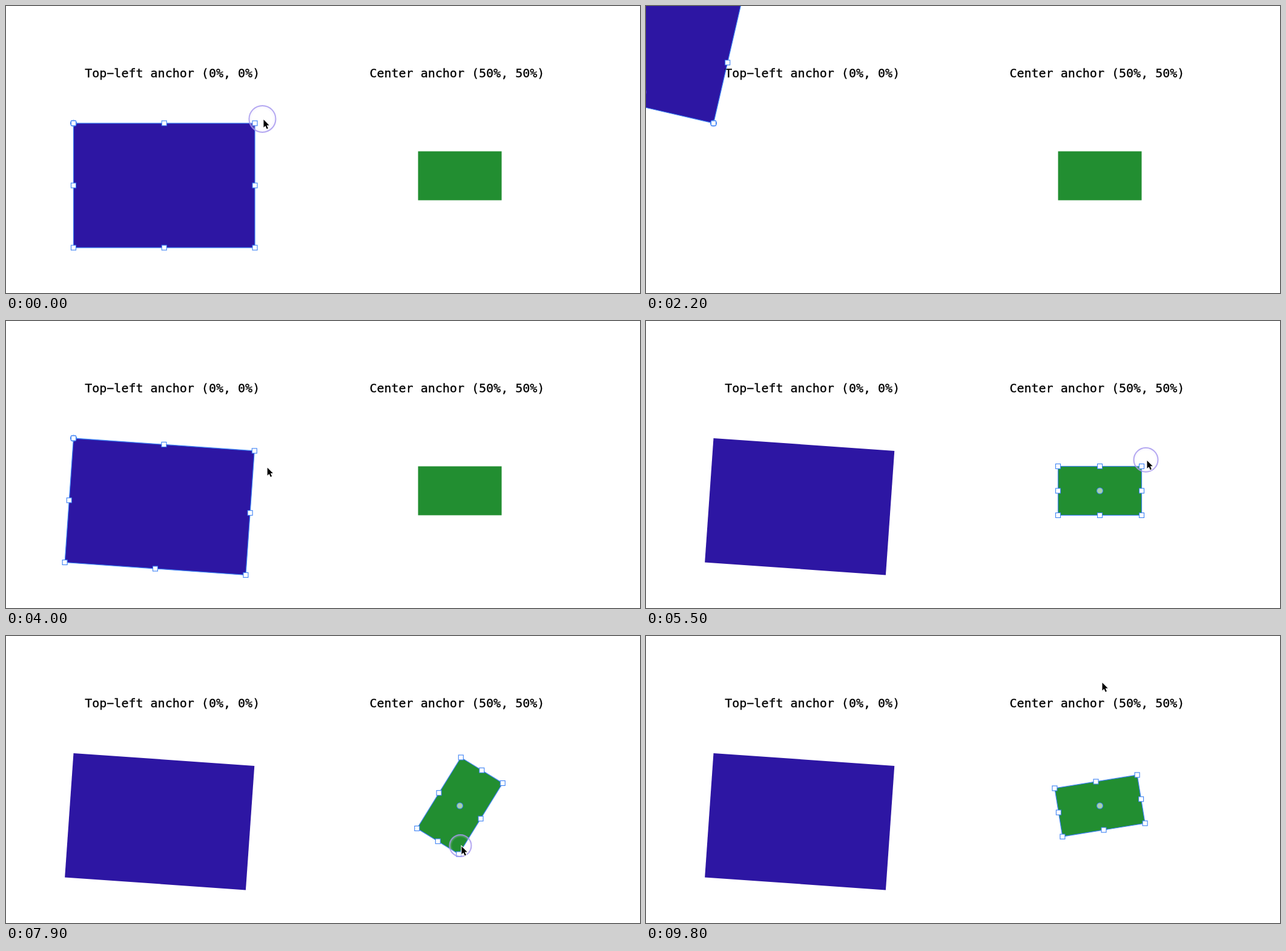
Recreate the animation shown at these times as an HTML page. Size 1047 px wide and 475 px high, loop 9.9 s.

```html
<!DOCTYPE html>
<html lang="en">
<head>
<meta charset="utf-8">
<title>Rotation anchors</title>
<style>
html, body { margin: 0; width: 100%; height: 100%; overflow: hidden; background: #fff; }
svg { display: block; width: 1047px; height: 475px; }
text { font: 20px "DejaVu Sans Mono", monospace; fill: #000; stroke: #000; stroke-width: .35; }
.line { fill: none; stroke: #3d82f5; stroke-width: 1.2; }
.grip { fill: #fff; stroke: #3d82f5; stroke-width: 1.1; }
</style>
</head>
<body>
<svg id="stage" viewBox="0 0 1047 475">
  <defs>
    <radialGradient id="glow">
      <stop offset=".75" stop-color="#e4defc" stop-opacity="0"/>
      <stop offset="1" stop-color="#e4defc" stop-opacity=".4"/>
    </radialGradient>
  </defs>
  <g id="shapes"></g>
  <text x="130.2" y="118">Top−left anchor (0%, 0%)</text>
  <text x="600.4" y="118">Center anchor (50%, 50%)</text>
  <g id="frames"></g>
  <circle id="ring" fill="url(#glow)" stroke="#a394ee" stroke-opacity=".8" stroke-width="2"/>
  <path id="arrow" d="M0 0V13L3 10.2L5.2 15.3L7.4 14.4L5.2 9.3H9.2Z" stroke="#fff" stroke-width="2" paint-order="stroke"/>
</svg>
<script>
const NS = "http://www.w3.org/2000/svg";
const LOOP = 9900, STEP = 100;
const PAUSES = [2300, 4500, 6500, 9000, 9300];
const BLUE_DROP = 3700, HOVER = 4400, SELECT = 4700, GREEN_GRAB = 5500, GREEN_DROP = 9700;
const PRESSES = [[0, BLUE_DROP], [4650, 4850], [5400, GREEN_DROP]];
const $ = id => document.getElementById(id);

function add(parent, tag, attrs) {
  const el = document.createElementNS(NS, tag);
  set(el, attrs);
  return parent.appendChild(el);
}
function set(el, attrs) {
  for (const k in attrs) el.setAttribute(k, attrs[k]);
}
const show = (el, on) => { el.style.display = on ? "" : "none"; };

const smooth = u => {
  u = Math.max(0, Math.min(1, u));
  return u * u * (3 - 2 * u);
};
const bump = (t, mid, width) => Math.exp(-(((t - mid) / width) ** 2));

// Smooth curve through keys [time, ...values], at rest at both ends
function spline(keys, t) {
  const last = keys.length - 1;
  t = Math.max(keys[0][0], Math.min(keys[last][0], t));
  const i = Math.max(1, keys.findIndex(k => t <= k[0]));
  const a = keys[i - 1], b = keys[i], span = b[0] - a[0], u = (t - a[0]) / span;
  const slope = (n, j) => n === 0 || n === last ? 0 :
    (keys[n + 1][j] - keys[n - 1][j]) / (keys[n + 1][0] - keys[n - 1][0]);
  return a.slice(1).map((v, n) => {
    const j = n + 1;
    return v + (b[j] - v) * smooth(u) +
      span * u * (1 - u) * ((1 - u) * slope(i - 1, j) - u * slope(i, j));
  });
}

// A rectangle that turns about (cx, cy); ax, ay give the anchor as a fraction
function makeBox(cx, cy, w, h, ax, ay, fill) {
  const size = { x: -w * ax, y: -h * ay, width: w, height: h };
  const body = add($("shapes"), "rect", { ...size, fill });
  const frame = add($("frames"), "g", {});
  const line = add(frame, "rect", { ...size, class: "line" });
  const dot = add(frame, "circle", {
    cx, cy, r: 5, fill: "#fff", "fill-opacity": .6, stroke: "#3d82f5", "stroke-width": 1.1
  });
  const grips = [];
  for (const u of [0, .5, 1]) for (const v of [0, .5, 1]) {
    if (u === .5 && v === .5) continue;
    const el = add(frame, "rect", { width: 8, height: 8, class: "grip" });
    grips.push({ el, x: (u - ax) * w, y: (v - ay) * h });
  }
  return {
    turn(deg, mode) {
      const a = deg * Math.PI / 180, c = Math.cos(a), s = Math.sin(a);
      const transform = `translate(${cx} ${cy}) rotate(${deg})`;
      set(body, { transform });
      set(line, { transform });
      line.style.strokeWidth = mode === "hover" ? 3.5 : 1.2;
      for (const g of grips) {
        set(g.el, { x: cx + g.x * c - g.y * s - 4, y: cy + g.x * s + g.y * c - 4 });
        show(g.el, mode === "selected");
      }
      show(dot, mode === "selected");
      show(frame, mode !== "none");
    },
    polar(deg, r) {
      const a = deg * Math.PI / 180;
      return [cx + r * Math.cos(a), cy + r * Math.sin(a)];
    }
  };
}

const blue = makeBox(111.5, 194, 299.5, 206, 0, 0, "#2d16a3");
const green = makeBox(749.5, 281, 138, 81, .5, .5, "#228e31");

// One full turn of the blue box, two turns of the green one with a final flick back
const blueTurn = [
  [0, 0], [1000, 61.4], [1300, 76], [2000, 143], [2200, 193],
  [2900, 311], [3100, 343], [BLUE_DROP, 364]
];
const greenTurn = [
  [GREEN_GRAB, 0], [6400, 130], [7100, 328.6], [7500, 380], [8500, 640],
  [8900, 699.2], [9500, 762], [GREEN_DROP, 710.8]
];

// The pointer leads or trails the box a little while its distance swings in and out
function dragBlue(t, deg) {
  const lead = 10.4 * Math.sin(Math.PI * t / BLUE_DROP) - 1.3;
  const r = 140 + 172 * smooth(1 - t / 1300) + 70 * smooth((t - 2200) / 900);
  return blue.polar(deg + lead, r);
}
function dragGreen(t, deg) {
  const lead = 9 * bump(t, 7100, 600) - 34;
  const r = 66 + 40 * bump(t, 5700, 300) + 88 * bump(t, 6970, 170);
  return green.polar(deg + lead, r);
}

const crossing = [
  [BLUE_DROP, ...dragBlue(BLUE_DROP, 364)], [4100, 490, 256], [HOVER, 744, 283],
  [SELECT, 752, 279], [5200, 852, 217], [GREEN_GRAB, 826, 229]
];
const leaving = [[GREEN_DROP, ...dragGreen(GREEN_DROP, 710.8)], [9800, 751.5, 76]];

function pointer(t, blueDeg, greenDeg) {
  if (t < BLUE_DROP) return dragBlue(t, blueDeg);
  if (t < GREEN_GRAB) return spline(crossing, t);
  if (t < GREEN_DROP) return dragGreen(t, greenDeg);
  return spline(leaving, t);
}

function draw(ms) {
  let t = Math.floor(ms / STEP) * STEP;
  if (PAUSES.includes(t)) t -= STEP;

  const [blueDeg] = spline(blueTurn, t), [greenDeg] = spline(greenTurn, t);
  blue.turn(blueDeg, t < SELECT ? "selected" : "none");
  green.turn(greenDeg, t >= SELECT ? "selected" : t >= HOVER ? "hover" : "none");

  const [x, y] = pointer(t, blueDeg, greenDeg);
  set($("arrow"), { transform: `translate(${x + 2} ${y + 1.2})` });

  const press = PRESSES.find(([a, b]) => t >= a && t < b);
  show($("ring"), press);
  if (press) set($("ring"), { cx: x, cy: y, r: 22 - 4 * smooth((t - press[0]) / 200) });
}

const start = performance.now();
function tick() {
  draw((performance.now() - start) % LOOP);
  requestAnimationFrame(tick);
}
tick();
</script>
</body>
</html>
```
